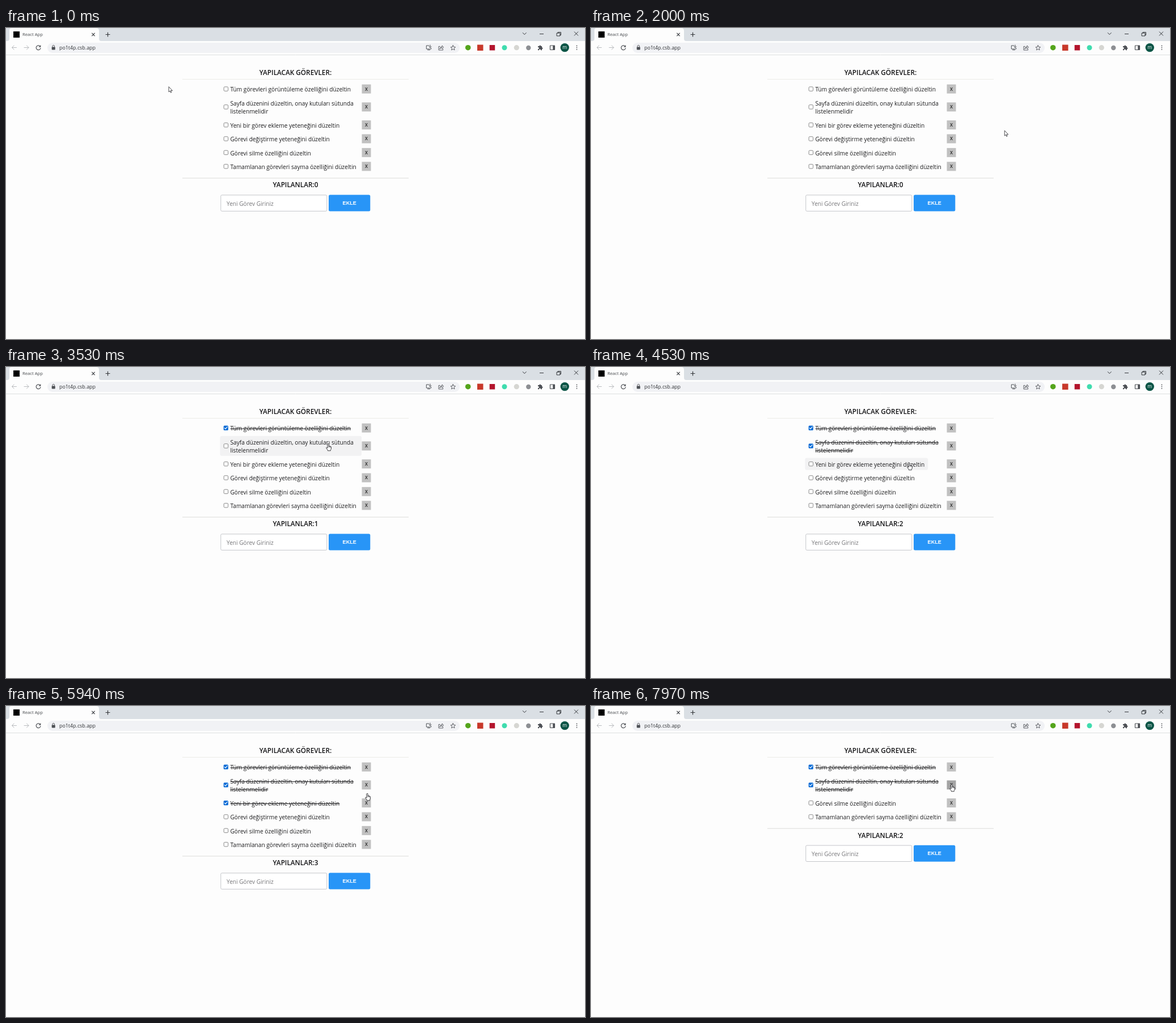
Write an HTML page with a canvas that moves like this. It is 1021 px wide and 549 px high and loops after 8 s.

```html
<!DOCTYPE html>
<html lang="tr">
<head>
<meta charset="utf-8">
<title>React App</title>
<style>
  html, body { margin: 0; width: 100%; height: 100%; overflow: hidden; background: #fdfdfd; }
  canvas { display: block; width: 1021px; height: 549px; }
</style>
</head>
<body>
<canvas id="stage"></canvas>
<script>
const W = 1021, H = 549, LOOP = 8000;
const canvas = document.getElementById('stage');
const ctx = canvas.getContext('2d');
const dpr = window.devicePixelRatio || 1;
canvas.width = W * dpr;
canvas.height = H * dpr;

const UI = '"Open Sans", "Noto Sans", sans-serif';
const ARIAL = '"Liberation Sans", Arial, sans-serif';
const TASK_FONT = '10.13px ' + UI;
const HEAD_FONT = '600 11.75px ' + UI;
const ROW = 24.4, TALL_ROW = 39.1, LIST_TOP = 95.4;

// done / gone: moment the task is ticked / removed
const tasks = [
  { lines: ['Tüm görevleri görüntüleme özelliğini düzeltin'], done: 2950 },
  { lines: ['Sayfa düzenini düzeltin, onay kutuları sütunda', 'listelenmelidir'], done: 3900 },
  { lines: ['Yeni bir görev ekleme yeteneğini düzeltin'], done: 4800, gone: 6300 },
  { lines: ['Görevi değiştirme yeteneğini düzeltin'], gone: 7000 },
  { lines: ['Görevi silme özelliğini düzeltin'] },
  { lines: ['Tamamlanan görevleri sayma özelliğini düzeltin'] }
];

// time, x, y of the pointer tip
const path = [
  [0, 287, 104], [150, 287, 104], [1200, 822, 232], [1500, 822, 232],
  [2570, 617, 120], [2850, 590, 106], [3050, 590, 106], [3530, 568, 135],
  [3950, 565, 137], [4350, 561, 169], [4900, 561, 169], [5940, 637, 154],
  [6150, 636, 168], [7350, 636, 168], [7900, 636, 138], [8000, 636, 138]
];

function pointerAt(t) {
  let i = 0;
  while (i < path.length - 2 && t >= path[i + 1][0]) i++;
  const a = path[i], b = path[i + 1];
  const u = (t - a[0]) / (b[0] - a[0]);
  const k = u * u * (3 - 2 * u);
  return { x: a[1] + (b[1] - a[1]) * k, y: a[2] + (b[2] - a[2]) * k };
}

function text(str, x, y, font, color, align = 'left') {
  ctx.font = font;
  ctx.fillStyle = color;
  ctx.textAlign = align;
  ctx.fillText(str, x, y);
}

function box(x, y, w, h, r, fill, stroke, lw = 1) {
  ctx.beginPath();
  ctx.roundRect(x, y, w, h, r);
  if (fill) { ctx.fillStyle = fill; ctx.fill(); }
  if (stroke) { ctx.strokeStyle = stroke; ctx.lineWidth = lw; ctx.stroke(); }
}

function disc(x, y, r, fill) {
  ctx.beginPath();
  ctx.arc(x, y, r, 0, 7);
  ctx.fillStyle = fill;
  ctx.fill();
}

function line(color, lw, ...p) {
  ctx.beginPath();
  for (let i = 0; i < p.length; i += 2) ctx.lineTo(p[i], p[i + 1]);
  ctx.strokeStyle = color;
  ctx.lineWidth = lw;
  ctx.stroke();
}

function shape(x, y, d, fill, stroke, lw = 1) {
  const p = new Path2D(d);
  ctx.save();
  ctx.translate(x, y);
  ctx.lineJoin = ctx.lineCap = 'round';
  if (fill) { ctx.fillStyle = fill; ctx.fill(p); }
  if (stroke) { ctx.strokeStyle = stroke; ctx.lineWidth = lw; ctx.stroke(p); }
  ctx.restore();
}

function drawTabs() {
  ctx.fillStyle = '#dadfe4';
  ctx.fillRect(0, 0, W, 23);
  shape(0, 0, 'M2 23Q6 23 6 19V4Q6 0 10 0H159Q164 0 164 5V19Q164 23 168 23Z', '#fdfdfd');
  box(13, 6, 11, 11, 0, '#000');
  text('React App', 29, 14, '7.7px ' + UI, '#45484c');
  const ink = '#33363a';
  shape(154, 11.5, 'M-2.4 -2.4L2.4 2.4M2.4 -2.4L-2.4 2.4', null, ink, 1.1);
  shape(179.5, 11.5, 'M-3.5 0H3.5M0 -3.5V3.5', null, ink, 1.2);
  shape(914.3, 10, 'M-3 -1.5L0 1.5L3 -1.5', null, ink);
  line(ink, 1, 941, 10.5, 948, 10.5);
  shape(971.5, 7.5, 'M0 1.5H5.5V6.5H0ZM1.5 1.5V0H7V5H5.5', null, ink);
  shape(1005.5, 10, 'M-3.2 -3.2L3.2 3.2M3.2 -3.2L-3.2 3.2', null, ink);
}

function drawToolbar() {
  ctx.fillStyle = '#fdfdfd';
  ctx.fillRect(0, 23, W, 24);
  line('#dddfe1', 1, 0, 47.5, W, 47.5);
  const ink = '#4d5055', pale = '#b9bbbe';
  shape(14.5, 34.5, 'M4 0H-4M-0.5 -3.6L-4 0L-0.5 3.6', null, pale);
  shape(36, 34.5, 'M-4 0H4M0.5 -3.6L4 0L0.5 3.6', null, pale);
  shape(57, 34.5, 'M3.2 -2A3.9 3.9 0 1 0 3.9 1', null, ink, 1.2);
  shape(57, 34.5, 'M4.3 -4.4V-0.7H0.7Z', ink);

  box(73, 26, 727, 18, 9, '#f1f2f5');
  box(80.7, 33.5, 6, 5, 0.8, ink);
  shape(83.7, 33.5, 'M-1.8 0V-1.3A1.8 1.8 0 0 1 1.8 -1.3V0', null, ink, 0.9);
  text('po1t4p.csb.app', 94, 38.2, '8.9px ' + UI, '#303236');

  shape(745.5, 34.5, 'M0.5 -3.5H-4.2V2.5H4.2V1M-2 4.2H2M2.5 -4.5V0M0.5 -1.8L2.5 0.2L4.5 -1.8', null, ink);
  shape(767, 35, 'M-1.8 -2.5H-4V4H3.5V2.2M-2 1.5Q-1.6 -2 2 -2V-4L4.6 -1L2 1.6V-0.2Q-0.4 -0.2 -2 1.5Z', null, ink, 0.9);
  shape(788.3, 35, 'M0 -4.4L1.3 -1.5L4.3 -1.2L2 0.9L2.7 3.9L0 2.3L-2.7 3.9L-2 0.9L-4.3 -1.2L-1.3 -1.5Z', null, ink, 0.9);

  disc(814.7, 34.7, 4.8, '#55a51c');
  box(831, 29.5, 10.5, 10.5, 0, '#c8392b');
  box(852.7, 30, 9.5, 9.5, 0, '#b3142c');
  disc(879, 34.7, 4.5, '#3fdcae');
  disc(900.3, 34.7, 4.6, '#d6d6d2');
  disc(921.3, 35, 4.2, '#8d8f93');
  shape(942, 35, 'M-4 -3H-1.7A1.5 1.5 0 1 1 1.3 -3H3V-0.8A1.5 1.5 0 1 1 3 2.2V4.3H0.8A1.4 1.4 0 1 0 -1.8 4.3H-4V1.8A1.4 1.4 0 1 0 -4 -0.8Z', ink);
  box(959.5, 31, 8, 7.5, 0.5, null, ink, 1.2);
  ctx.fillStyle = ink;
  ctx.fillRect(964.3, 31, 3.2, 7.5);
  disc(985.3, 34.6, 7.7, '#0b5546');
  text('m', 985.3, 37.3, '8.5px ' + UI, '#fff', 'center');
  for (const dy of [-3.2, 0, 3.2]) disc(1006.5, 34.6 + dy, 0.9, ink);
}

function drawCheck(y, on) {
  if (on) {
    box(383.7, y - 4, 8.2, 8.2, 1.5, '#0a6cd6');
    shape(387.8, y, 'M-2.4 0.2L-0.8 1.9L2.5 -1.9', null, '#fff', 1.2);
  } else {
    box(384.2, y - 3.6, 7.4, 7.4, 1.5, '#fff', '#7c7c7c', 0.9);
  }
}

function drawTask(task, top, t, hot) {
  const tall = task.lines.length > 1;
  const height = tall ? TALL_ROW : ROW;
  const mid = top + height / 2;
  const done = t >= task.done;
  ctx.font = TASK_FONT;
  const right = tall ? 627 : 395.5 + ctx.measureText(task.lines[0]).width + 6;
  const half = tall ? 17.5 : 10.7;
  const inRow = Math.abs(hot.y - mid) <= half;
  if (inRow && hot.x > 377.5 && hot.x < right) {
    box(377.5, mid - half, right - 377.5, half * 2, 3, '#f2f2f3');
  }
  drawCheck(mid - 0.1, done);
  task.lines.forEach((str, i) => {
    const base = mid + 4.6 + (tall ? i * 14.4 - 7.2 : 0);
    text(str, 395.5, base, TASK_FONT, '#1c1c1e');
    if (done) {
      const w = ctx.measureText(str).width;
      line('#1c1c1e', 1, 395.5, base - 3.2, 395.5 + w, base - 3.2);
    }
  });
  const over = Math.abs(hot.x - 635.5) < 8 && Math.abs(hot.y - mid) < 8;
  box(627.5, mid - 8, 16, 16, 0, over ? '#a4a4a4' : '#c1c1c1');
  text('x', 635.5, mid + 2.9, '10px ' + ARIAL, '#111', 'center');
  return top + height;
}

function drawFooter(y, count) {
  line('#dcdcda', 1, 311, y, 710, y);
  text('YAPILANLAR:' + count, 510.5, y + 16.4, HEAD_FONT, '#141416', 'center');
  box(378.8, y + 29.9, 187, 28.4, 2, '#fff', '#c4c5ca');
  text('Yeni Görev Giriniz', 389, y + 48.6, '10.1px ' + UI, '#77777a');
  box(569, y + 29.6, 73.3, 29, 2.5, '#2895f7');
  text('EKLE', 605.7, y + 46.8, 'bold 9.1px ' + ARIAL, '#fff', 'center');
}

function drawPointer(p) {
  const overList = p.x > 377 && p.x < 645 && p.y > 95 && p.y < 255;
  if (overList) {
    shape(p.x, p.y,
      'M-1.1 1Q0 -0.7 1.1 1V4.4Q2.2 3.5 2.8 4.8Q3.9 4.2 4.2 5.4Q5.4 5.2 5.4 6.5V9Q5.2 10.6 4.3 11.4V12.8H-0.7V11.6Q-1.8 10.4 -3.4 7.7Q-3.3 6.1 -1.1 7.7Z',
      '#fff', '#26262a', 0.9);
    shape(p.x, p.y, 'M1.1 4.4V6.4M2.8 4.9V6.6M4.2 5.5V6.8', null, '#26262a', 0.7);
  } else {
    shape(p.x, p.y, 'M0 0V8.9L2 7.1L3.5 10.2L4.8 9.6L3.4 6.6H6.1Z', '#fff', '#3a3a3e', 0.9);
  }
}

function draw(t) {
  ctx.setTransform(dpr, 0, 0, dpr, 0, 0);
  ctx.fillStyle = '#fdfdfd';
  ctx.fillRect(0, 0, W, H);
  drawTabs();
  drawToolbar();
  text('YAPILACAK GÖREVLER:', 510.5, 83.4, HEAD_FONT, '#141416', 'center');
  line('#ecece7', 1, 311, 90.5, 710, 90.5);

  const p = pointerAt(t);
  const hot = { x: p.x, y: p.y + 3 };
  const live = tasks.filter(k => !(t >= k.gone));
  let y = LIST_TOP;
  for (const k of live) y = drawTask(k, y, t, hot);
  drawFooter(y + 8.5, live.filter(k => t >= k.done).length);
  drawPointer(p);
}

const start = performance.now();
function tick() {
  draw((performance.now() - start) % LOOP);
  requestAnimationFrame(tick);
}
tick();
</script>
</body>
</html>
```
